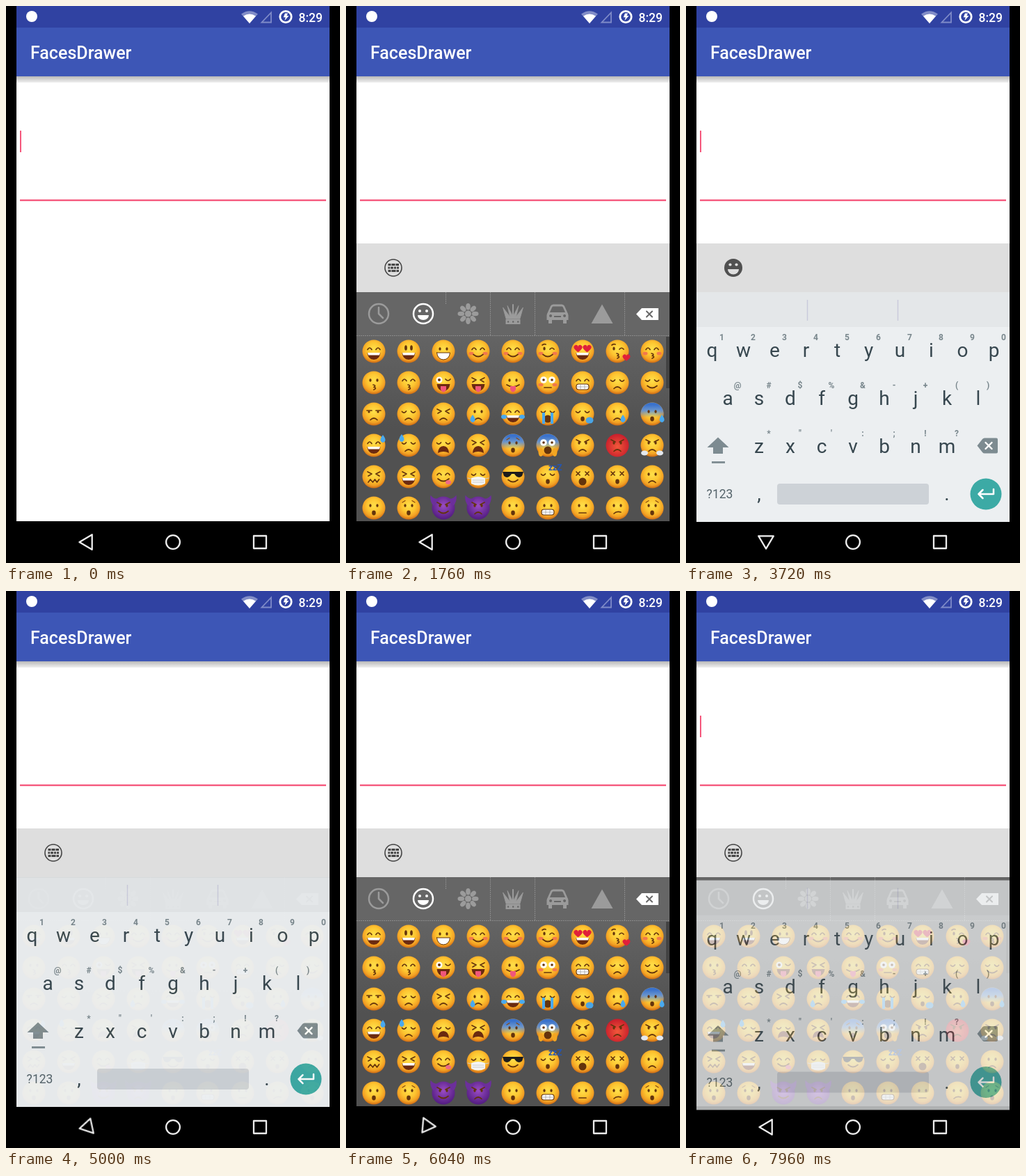
Animation, 480 px wide and 800 px high, one loop 8000 ms. Source, as an HTML page:

```html
<!DOCTYPE html>
<html lang="en">
<head>
<meta charset="utf-8">
<title>Emoji keyboard</title>
<style>
html, body { margin: 0; height: 100%; overflow: hidden; background: #000; }
svg { display: block; width: 100vw; height: 100vh; font-family: Roboto, sans-serif; }
.line { fill: none; stroke-linecap: round; stroke-linejoin: round; }
.mid { text-anchor: middle; }

/* 1% = 80 ms */
#cursor, #traffic, #sheet, .emoji, .smiley { animation: 8s step-end infinite; }
#cursor { animation-name: blink; }
#traffic { animation-name: traffic; }
#sheet { animation-name: sheet; }
.emoji { animation-name: emoji; }
.smiley { animation-name: smiley; }
#keys { animation: fade 8s linear infinite, slide 8s linear infinite; }
#back { transform-origin: 115px 770px; animation: turn 8s linear infinite; }

@keyframes blink {
  0%, 8.5%, 16.5%, 24.5%, 32.5%, 46.5%, 54.5%, 63.5%, 83.5%, 92% { opacity: 1; }
  4.5%, 12.5%, 20.5%, 28.5%, 42.5%, 50.5%, 58.5%, 68.5%, 88% { opacity: 0; }
}
@keyframes traffic {
  0%, 42.5% { opacity: 0; }
  28% { opacity: 1; }
}
@keyframes sheet {
  0% { opacity: 0; }
  4.5%, 100% { opacity: 1; }
}
@keyframes emoji {
  0%, 37%, 75.75% { opacity: 0; }
  18%, 61.75%, 98.5%, 100% { opacity: 1; }
}
@keyframes smiley {
  0%, 37%, 75.75% { opacity: 1; }
  18%, 61.75%, 98.5%, 100% { opacity: 0; }
}
@keyframes fade {
  0%, 4.5%, 21%, 38.5%, 64.45%, 76% { opacity: 0; }
  7.5%, 19%, 41.25%, 62.45%, 78.75%, 99% { opacity: 1; }
  100% { opacity: .5; }
}
@keyframes slide {
  0%, 4.5%, 21%, 38.5%, 64.45%, 76% {
    transform: translateY(70px);
    animation-timing-function: cubic-bezier(.33, .67, .67, 1);
  }
  7.5%, 19%, 41.25%, 62.45%, 78.75%, 99% {
    transform: none;
    animation-timing-function: cubic-bezier(.33, 0, .67, .33);
  }
  100% { transform: translateY(17.5px); }
}
@keyframes turn {
  0%, 3%, 19.25%, 37.3%, 62.85%, 74%, 99%, 100% { transform: rotate(0deg); }
  5.5%, 16.75%, 39.8%, 60.35%, 76.5%, 96.5% { transform: rotate(-90deg); }
}
</style>
</head>
<body>
<svg viewBox="0 0 480 800">
  <defs>
    <linearGradient id="shade" x2="0" y2="1">
      <stop stop-color="#b8b8b8"/><stop offset="1" stop-color="#f0f0f0"/>
    </linearGradient>
    <linearGradient id="wall" x2="0" y2="1">
      <stop stop-color="#646464"/><stop offset=".5" stop-color="#515151"/>
    </linearGradient>
    <radialGradient id="skin" cy=".4" r=".6">
      <stop stop-color="#ffe04a"/><stop offset=".5" stop-color="#fdc430"/>
      <stop offset=".8" stop-color="#f2a024"/><stop offset="1" stop-color="#cf6c14"/>
    </radialGradient>
    <radialGradient id="red" cy=".55" r=".6">
      <stop stop-color="#f2583a"/><stop offset="1" stop-color="#c4182a"/>
    </radialGradient>
    <radialGradient id="purple" cy=".4" r=".6">
      <stop stop-color="#9a4cc4"/><stop offset="1" stop-color="#521c80"/>
    </radialGradient>
    <linearGradient id="chill" x2="0" y2="1">
      <stop offset=".1" stop-color="#3a72cc"/><stop offset=".35" stop-color="#5b90dc" stop-opacity=".9"/>
      <stop offset=".65" stop-color="#5b90dc" stop-opacity="0"/>
    </linearGradient>
  </defs>

  <rect width="480" height="800"/>
  <rect x="15" width="450" height="740" fill="#fff"/>
  <rect x="15" y="101" width="450" height="9" fill="url(#shade)"/>
  <rect x="15" width="450" height="31" fill="#3042a2"/>
  <rect x="15" y="31" width="450" height="70" fill="#3d56b6"/>
  <text x="35" y="76" font-size="25" font-weight="500" fill="#fff">FacesDrawer</text>

  <g id="status" fill="#fff">
    <circle cx="37" cy="15" r="8"/>
    <path d="M350 25L338 11.5Q350 3 362 11.5Z" opacity=".4"/>
    <path d="M350 25L341 14.5Q350 8.5 359 14.5Z"/>
    <path id="traffic" d="M347 18.5h6l-3 3.5Z" fill="#3042a2"/>
    <path d="M367.5 23.5H381V9.5Z" fill="none" stroke="#7f8bc8" stroke-width="1.8"/>
    <circle cx="402" cy="15.500" r="8.200" fill="none" stroke="#fff" stroke-width="2.800"/>
    <path d="M401 10.5h4l-1.500 3.500h3l-6 7 1.200-4.800h-3Z"/>
    <text x="420.5" y="22.500" font-size="17.500" font-weight="500">8:29</text>
  </g>

  <rect x="20" y="277.800" width="440" height="2.400" fill="#f5587d"/>
  <rect id="cursor" x="20" y="179" width="2" height="31" fill="#f5587d"/>

  <g id="sheet">
    <rect x="15" y="341" width="450" height="399" fill="#eee"/>
    <rect x="15" y="341" width="450" height="70" fill="#dedede"/>
    <g class="smiley">
      <circle cx="68" cy="376" r="13" fill="#505050"/>
      <path d="M60 378h16a8 7.500 0 0 1-16 0Z" fill="#dedede"/>
      <circle cx="63.5" cy="371.5" r="2.100" fill="#dedede"/>
      <circle cx="72.5" cy="371.5" r="2.100" fill="#dedede"/>
    </g>
    <g class="emoji" stroke="#444" fill="none">
      <circle cx="68" cy="376" r="12" stroke-width="1.600"/>
      <path d="M60.500 371.500h4m1 0h5m1 0h4.500M60.500 376h2.500m1 0h4m1 0h3m1 0h3M60.500 380.500h4m1 0h6m1 0h3.500" stroke-width="3.200"/>
    </g>
  </g>

  <g class="emoji" id="panel">
    <rect x="15" y="411" width="450" height="62" fill="#666"/>
    <rect x="15" y="473" width="450" height="267" fill="url(#wall)"/>
    <rect x="460" y="475" width="5" height="74" fill="#424242"/>
    <path d="M15 473.500H465M207.500 411v62M271.500 411v62M400.500 411v62M143.500 411v18" stroke="#8b8b8b" stroke-dasharray="2 1"/>
    <g id="tabs" class="line" stroke="#9b9b9b" stroke-width="2.500">
      <circle cx="47" cy="442" r="14"/><path d="M47 433v9l6 6"/>
      <g stroke="#fff"><circle cx="111" cy="442" r="14"/>
        <path d="M103 444h16a8 7 0 0 1-16 0Z" fill="#fff" stroke="none"/>
        <path d="M106 438v.1M116 438v.1" stroke-width="4"/></g>
      <g id="flower" fill="#9b9b9b" stroke="none"></g>
      <path d="M230 449L225.500 433 235.500 446 232 430.500 240 446 248 430.500 244.500 446 254.500 433 250 449Z" fill="#9b9b9b" stroke-width=".8"/>
      <path d="M240 446V429" stroke-width="2"/>
      <path d="M229.500 453.500h21" stroke-width="7" stroke-linecap="butt"/>
      <path d="M233 453.500h15" stroke="#666" stroke-width="2.400" stroke-dasharray=".1 7"/>
      <path d="M291 441l4-9q1-2 3-2h12q2 0 3 2l4 9" stroke-width="2.800"/>
      <path fill="#9b9b9b" fill-rule="evenodd" stroke="none" d="M291 440h26q2.500 1 2.500 4v7h-2.500v5h-5v-5h-16v5h-5v-5h-2.500v-7q0-3 2.500-4Zm3 3a2 2 0 1 0 .1 0Zm20 0a2 2 0 1 0 .1 0Zm-15 2h10v2h-10Z"/>
      <path d="M368 428.500L383.500 456H352.500Z" fill="#9b9b9b" stroke="none"/>
      <path d="M417 442.500l8-8.500h24v17h-24Z" fill="#fff" stroke="none"/>
      <path d="M432 438.500l8 8m0-8l-8 8" stroke="#666" stroke-width="2"/>
    </g>
    <g id="faces"></g>
  </g>

  <g id="keys">
    <rect x="15" y="411" width="450" height="330" fill="#eceff1"/>
    <rect x="15" y="411" width="450" height="50" fill="#e4e7e9"/>
    <path d="M174.500 422v30M304.500 422v30" stroke="#c9cbdc" stroke-width="1.500"/>
    <g id="letters" class="mid" fill="#37474f" font-size="28"></g>
    <g fill="#7d8b91">
      <path d="M46 619.500L61.500 634H53v9H39v-9h-8.500Z"/><path d="M37 654h19v2.800H37Z"/>
      <path d="M418.500 631.500l7.500-9.500q1.300-1.500 3-1.500h17q2 0 2 2v18q0 2-2 2h-17q-1.700 0-3-1.500Z"/>
    </g>
    <path class="line" d="M430.500 627l9 9m0-9l-9 9" stroke="#fff" stroke-width="2.400"/>
    <rect x="131" y="686" width="218" height="30" rx="4" fill="#cdd2d7"/>
    <circle cx="431" cy="701" r="22.500" fill="#3caaa5"/>
    <path class="line" d="M442 694v7H420.500m6-6l-6 6 6 6" stroke="#fff" stroke-width="2.500"/>
  </g>

  <g class="line" stroke="#ececec" stroke-width="2.300">
    <path id="back" d="M105.500 770L123.700 759.200V780.800Z"/>
    <circle cx="240" cy="770" r="9.900"/>
    <rect x="356" y="761" width="18" height="18"/>
  </g>
</svg>

<script>
const put = (id, html) => { document.getElementById(id).innerHTML += html; };
const ink = '#64340c';
const fill = (d, c) => `<path d="${d}" fill="${c}"/>`;
const line = (d, c = ink, w = 1.7) => `<path class="line" d="${d}" stroke="${c}" stroke-width="${w}"/>`;
const oval = (x, y, rx, ry, c = ink) => `<ellipse cx="${x}" cy="${y}" rx="${rx}" ry="${ry}" fill="${c}"/>`;
const pair = f => f(-1) + f(1);
const heart = (x, y, s) => `<g transform="translate(${x} ${y}) scale(${s})">${fill('M0 5Q-10-2-3-5Q0-5 0-2Q0-5 3-5Q10-2 0 5Z', '#e0203a')}</g>`;
const drop = (x, y) => fill(`M${x} ${y - 6}q7 9 0 11q-7-2 0-11Z`, '#49a9ee');
const dots = pair(s => oval(s * 5, -3.5, 1.6, 2.3));

const eyes = {
  d: dots,
  t: pair(s => oval(s * 4, -5, 1.9, 3.8)),
  O: pair(s => oval(s * 6, -4, 4.8, 4.8, '#fff') + oval(s * 6, -4, 1.8, 1.8)),
  u: line('M-9-2.500q3-5 6 0M3-2.500q3-5 6 0'),
  c: line('M-9.500-3.500q3 3.500 6-.5M3.500-4q3 4 6 .5'),
  w: oval(-5, -4, 1.7, 2.5) + line('M3-3q3-3.500 6 0M-8-9q3-2 5-1'),
  W: oval(-6, -4, 4.5, 4.5, '#fff') + oval(-6, -4, 2, 2) + line('M3-5q3.500 4 7 0'),
  x: line('M-9-7l6 3-5 3M9-7l-6 3 5 3'),
  X: line('M-9-7l5 5m0-5l-5 5M4-7l5 5m0-5l-5 5'),
  h: pair(s => heart(s * 6.5, -4, 1.05)),
  g: dots + line('M-9-8l6 3M9-8l-6 3'),
  r: line('M-10-5h7M3-5h7') + oval(-7, -3, 1.6, 1.6) + oval(6, -3, 1.6, 1.6),
  s: fill('M-15-7H15L13-1Q7 4 2-4H-2Q-7 4-13-1Z', '#1c1c1c')
};
const open = c => fill('M-9.500 2H9.500Q8.500 11.500 0 12Q-8.500 11.500-9.500 2Z', c);
const dark = open('#6b2a10');
const tongue = fill('M-4 5H4V10Q0 17-4 10Z', '#f0567a');
const mouths = {
  s: line('M-7 4.500q7 6 14 0'),
  D: dark + fill('M-9 2H9L8 5.500H-8Z', '#fff'),
  w: open('#fff') + line('M-9.500 2H9.500Q8.500 11.500 0 12Q-8.500 11.500-9.500 2Z', ink, 1),
  k: line('M-1 3q5 1 1 3.500q5 1 0 3.500'),
  t: line('M-9 3q9 6 18 0') + tongue,
  T: dark + tongue,
  y: line('M-8 3q8 7 16 0') + oval(7, 8, 4, 3, '#ee6a86'),
  f: line('M-5 8.500q5-5 10 0'),
  n: line('M-5 7H5'),
  p: line('M-5 8q4-4 10-2'),
  o: oval(0, 7, 2.8, 3.4),
  O: oval(0, 7, 5.5, 5.5),
  Y: fill('M-8 11Q-7 1 0 1T8 11Q0 7-8 11Z', '#6b2a10'),
  G: '<rect x="-9" y="2" width="18" height="8" rx="3.500" fill="#fff" stroke="#64340c" stroke-width="1.200"/>' + line('M-8 6H8M-3 3v6M3 3v6', '#999', .7),
  z: line('M-8 8l3-4 3.500 4 3-4 3 4 3-4'),
  m: fill('M-10 2Q0-2 10 2V10Q0 15-10 10Z', '#f4f4f4') + line('M-15 2l5 1M15 2l-5 1M-8 5H8M-8 8H8', '#ccc', 1)
};
const extras = {
  b: pair(s => oval(s * 10, 3, 3.5, 2.3, '#f2784d')),
  l: drop(-8, 7),
  a: drop(8, 7),
  j: pair(s => oval(s * 13, 4, 4, 3, '#49a9ee')),
  S: pair(s => fill(`M${s * 6 - 2}-2h4V14h-4Z`, '#49a9ee')),
  q: drop(13, -9),
  e: drop(-10, -10),
  v: drop(14, 7),
  H: heart(13, 9, .95),
  N: oval(10, 9, 5.5, 4.5, '#4aa5e6'),
  K: pair(s => oval(s * 10, 10, 3.5, 6, '#f3a622')),
  V: pair(s => oval(s * 11, 11, 5, 3.5, '#e4e8ee')),
  Z: '<text x="1" y="-9" font-size="12" font-weight="700" fill="#2555b0">zzZ</text>',
  i: line('M-9-8l4-2.500M9-8l-4-2.500', '#8a4b10', 1.3)
};
const chill = '<circle r="16.500" fill="url(#chill)"/>';
const horns = pair(s => fill(`M${s * 18.5}-18.500Q${s * 20}-9 ${s * 14}-3L${s * 4}-14Q${s * 13}-11 ${s * 18.5}-18.500Z`, '#6c2f9c'));

// Each face: eyes, mouth, then any extras; R, P and B change the skin.
const rows = [
  'uD tD dw usb usb wsb hD wkH ukb',
  'dk uk WT xT dt Onb uG cf cs',
  'rf cf xf dfl uDj cOS coN dfa doBv',
  'uDq cfe cY xY doBi OOBK gf gfR gfV',
  'xz xD uy cm ss coZ XO Xo df',
  'do doi gsP gfP do dG dn dp doi'
];
rows.forEach((row, r) => row.split(' ').forEach((code, c) => {
  const [eye, mouth, ...more] = code;
  const has = k => more.includes(k);
  const skin = has('R') ? 'red' : has('P') ? 'purple' : 'skin';
  put('faces', `<g transform="translate(${40 + 50 * c} ${496 + 45 * r})">` +
    `<circle r="16.500" fill="url(#${skin})"/>` + (has('P') ? horns : '') + (has('B') ? chill : '') +
    (has('b') ? extras.b : '') + eyes[eye] + mouths[mouth] +
    more.filter(k => k !== 'b').map(k => extras[k] || '').join('') + '</g>');
}));

for (let i = 0; i < 8; i++)
  put('flower', `<ellipse cx="175.500" cy="431.800" rx="3.300" ry="4.800" transform="rotate(${i * 45} 175.500 442)"/>`);
put('flower', '<circle cx="175.500" cy="442" r="4.600"/>');

const label = (x, y, s, attr = '') => put('letters', `<text x="${x}" y="${y}" ${attr}>${s}</text>`);
[
  ['qwertyuiop', '1234567890', 37.5, 504],
  ['asdfghjkl', '@#$%&-+()', 60, 573],
  ['zxcvbnm', '*"\':;!?', 105, 642]
].forEach(([keys, hints, x, y]) => [...keys].forEach((k, i) => {
  label(x + 45 * i, y, k);
  label(x + 45 * i + 14, y - 24, hints[i].replace('&', '&amp;'), 'font-size="12" font-weight="700" fill="#78868c"');
}));
label(48.5, 707, '?123', 'font-size="17.500" fill="#55646b"');
label(105, 710, ',');
label(375, 710, '.');
</script>
</body>
</html>
```
